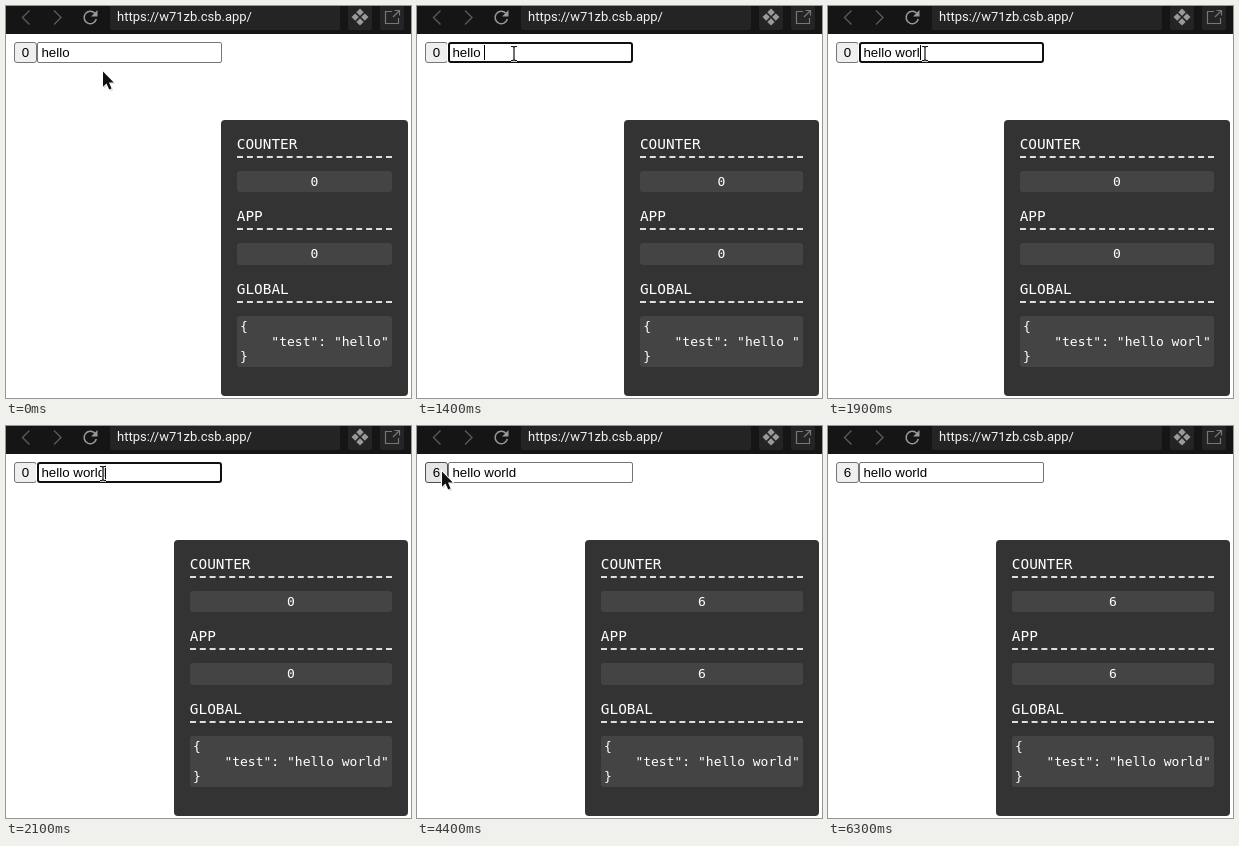
Animation, 405 px wide and 392 px high, one loop 6.4 s. Source, as an HTML page:

```html
<!DOCTYPE html>
<html lang="en">
<head>
<meta charset="utf-8">
<title>State panel demo</title>
<style>
  html, body { margin: 0; width: 100%; height: 100%; overflow: hidden; background: #fff; }
  #stage { position: relative; width: 405px; height: 392px; overflow: hidden; }
  #stage > * { position: absolute; box-sizing: border-box; }

  #toolbar { left: 0; top: 0; width: 405px; height: 28px; background: #151515; }
  #url {
    left: 104px; top: 0; width: 230px; height: 24px; padding-left: 7px;
    background: #242424; border-radius: 0 0 2px 2px; color: #f2f2f2;
    font: 13px/22px Roboto, sans-serif; white-space: pre;
  }
  #icons { left: 0; top: 0; }

  #button, #field {
    top: 36px; height: 21px; border: 1px solid #767676; border-radius: 2px;
    font: 13.333px/15px "Liberation Sans", Arial, sans-serif; color: #000; white-space: pre;
  }
  #button { left: 8px; width: 23px; padding-top: 2px; background: #efefef; text-align: center; border-radius: 3px; }
  #button.hover { background: #e5e5e5; border-color: #4f4f4f; }
  #field { left: 31px; width: 185px; padding: 2px 0 0 3.4px; background: #fff; }
  #field.hover { border-color: #4f4f4f; }
  #field.focus {
    border: 2px solid #101010; border-radius: 3px;
    padding: 1px 0 0 2.4px; box-shadow: 0 0 0 1px #fff;
  }
  #caret { display: inline-block; width: 1px; height: 15px; vertical-align: top; background: #000; }

  #panel {
    right: 3px; top: 114px; height: 276px; padding: 0 16px;
    background: #333; border-radius: 4px; color: #fff;
    font: 13px/15px "DejaVu Sans Mono", monospace;
  }
  #panel h3 {
    position: absolute; left: 16px; right: 16px; margin: 0; height: 20px;
    font-size: 14.4px; line-height: 17px; font-weight: 400;
    border-bottom: 2px dashed #ddd;
  }
  #panel .value, #panel pre { background: #444; border-radius: 3px; box-sizing: border-box; }
  #panel .value {
    position: absolute; left: 16px; right: 16px; padding-top: 3px; text-align: center;
  }
  #panel pre { margin: 196px 0 0; height: 51px; padding: 3px 3.25px; font: inherit; }

  #pointer { left: 0; top: 0; overflow: visible; }
</style>
</head>
<body>
<div id="stage">
  <div id="toolbar"></div>
  <div id="url">https://w71zb.csb.app/</div>
  <svg id="icons" width="405" height="28" fill="none" stroke-width="1.4">
    <g stroke="#5a5a5a">
      <path d="M23.5 4.5L16.5 11.5L23.5 18.5"/>
      <path d="M48 4.5L55 11.5L48 18.5"/>
    </g>
    <path d="M90.3 13A6.2 6.2 0 1 1 88.8 7.2" stroke="#999" stroke-width="1.5"/>
    <path d="M91.5 4V10.4H85.1Z" fill="#999"/>
    <path d="M342 0h24v22q0 2-2 2h-20q-2 0-2-2zM374 0h24v22q0 2-2 2h-20q-2 0-2-2z" fill="#242424"/>
    <path d="M354 2.6l3.7 3.7-3.7 3.7-3.7-3.7zM349.2 7.4l3.7 3.7-3.7 3.7-3.7-3.7zM358.8 7.4l3.7 3.7-3.7 3.7-3.7-3.7zM354 12.2l3.7 3.7-3.7 3.7-3.7-3.7z" fill="#999"/>
    <path d="M386 5.5H379.5V17.5H392.5V12M388.5 4.5H393.5V9.5M393.5 4.5L387 11" stroke="#777" stroke-width="1.2"/>
  </svg>

  <div id="button">0</div>
  <div id="field"><span id="text"></span><span id="caret"></span></div>

  <div id="panel">
    <h3 style="top:16px">COUNTER</h3>
    <div class="value" style="top:51px;height:21px">0</div>
    <h3 style="top:88px">APP</h3>
    <div class="value" style="top:123px;height:22px">0</div>
    <h3 style="top:161px">GLOBAL</h3>
    <pre id="json"></pre>
  </div>

  <svg id="pointer" width="1" height="1">
    <g id="arrow">
      <path d="M1 1V17L4.7 13.6L7.4 19.5L10 18.4L7.4 12.6H12.6Z" fill="#000" opacity=".2"/>
      <path d="M0 0V15.2L3.5 12L6.2 18L8.6 16.9L6 11.1H10.8Z" fill="#111" stroke="#fff" stroke-width="1.8" paint-order="stroke"/>
    </g>
    <g id="beam" fill="none">
      <path d="M-3 -6.5H3M-3 7.5H3M0 -6.5V7.5" stroke="#fff" stroke-width="3" opacity=".8"/>
      <path d="M-3 -6.5H-1L0 -5.5L1 -6.5H3M-3 7.5H-1L0 6.5L1 7.5H3M0 -6V7" stroke="#111" stroke-width="1.2"/>
    </g>
  </svg>
</div>

<script>
const LOOP = 6400;
const FULL_TEXT = 'hello world';
const keyTimes = [1400, 1500, 1700, 1800, 1900, 2100];
const clickTimes = [3400, 3600, 3800, 3900, 4100, 4400];
const focusSpan = [700, 3400];
const caretOff = [[1300, 1400], [2700, 3200]];
const buttonHover = [3200, 4800];
const fieldHover = [300, 3200];

// time, shape, x, y
const pointerSteps = [
  [0, 'arrow', 97, 65.5],
  [100, 'arrow', 96, 66],
  [300, 'beam', 96, 53],
  [400, 'beam', 97, 50],
  [600, 'beam', 97, 49],
  [700, 'beam', 97, 47],
  [2800, 'beam', 94, 48],
  [2900, 'beam', 85, 49],
  [3000, 'beam', 68, 50],
  [3100, 'beam', 48, 50],
  [3200, 'arrow', 28, 49],
  [3300, 'arrow', 25, 45.5],
  [4600, 'arrow', 26, 48],
  [4700, 'arrow', 28, 55],
  [4800, 'arrow', 33, 78],
  [4900, 'arrow', 39, 122],
  [5000, 'arrow', 46, 192],
  [5100, 'none', 0, 0],
];

const $ = id => document.getElementById(id);
const values = [$('button'), ...document.querySelectorAll('.value')];
const within = (t, [from, to]) => t >= from && t < to;
const passed = (times, t) => times.filter(time => time <= t).length;
const setText = (el, text) => { if (el.textContent !== text) el.textContent = text; };

function render(t) {
  const text = FULL_TEXT.slice(0, 5 + passed(keyTimes, t));
  const focused = within(t, focusSpan);
  const caretOn = focused && !caretOff.some(span => within(t, span));

  setText($('text'), text);
  setText($('json'), JSON.stringify({ test: text }, null, 4));
  values.forEach(el => setText(el, String(passed(clickTimes, t))));

  $('caret').style.visibility = caretOn ? 'visible' : 'hidden';
  $('field').classList.toggle('focus', focused);
  $('field').classList.toggle('hover', within(t, fieldHover));
  $('button').classList.toggle('hover', within(t, buttonHover));

  const [, shape, x, y] = pointerSteps[passed(pointerSteps.map(step => step[0]), t) - 1];
  $('pointer').style.transform = `translate(${x}px, ${y}px)`;
  for (const id of ['arrow', 'beam']) $(id).style.display = id === shape ? '' : 'none';
}

const start = performance.now();
function tick(now) {
  render(Math.max(0, now - start) % LOOP);
  requestAnimationFrame(tick);
}
render(0);
requestAnimationFrame(tick);
</script>
</body>
</html>
```
